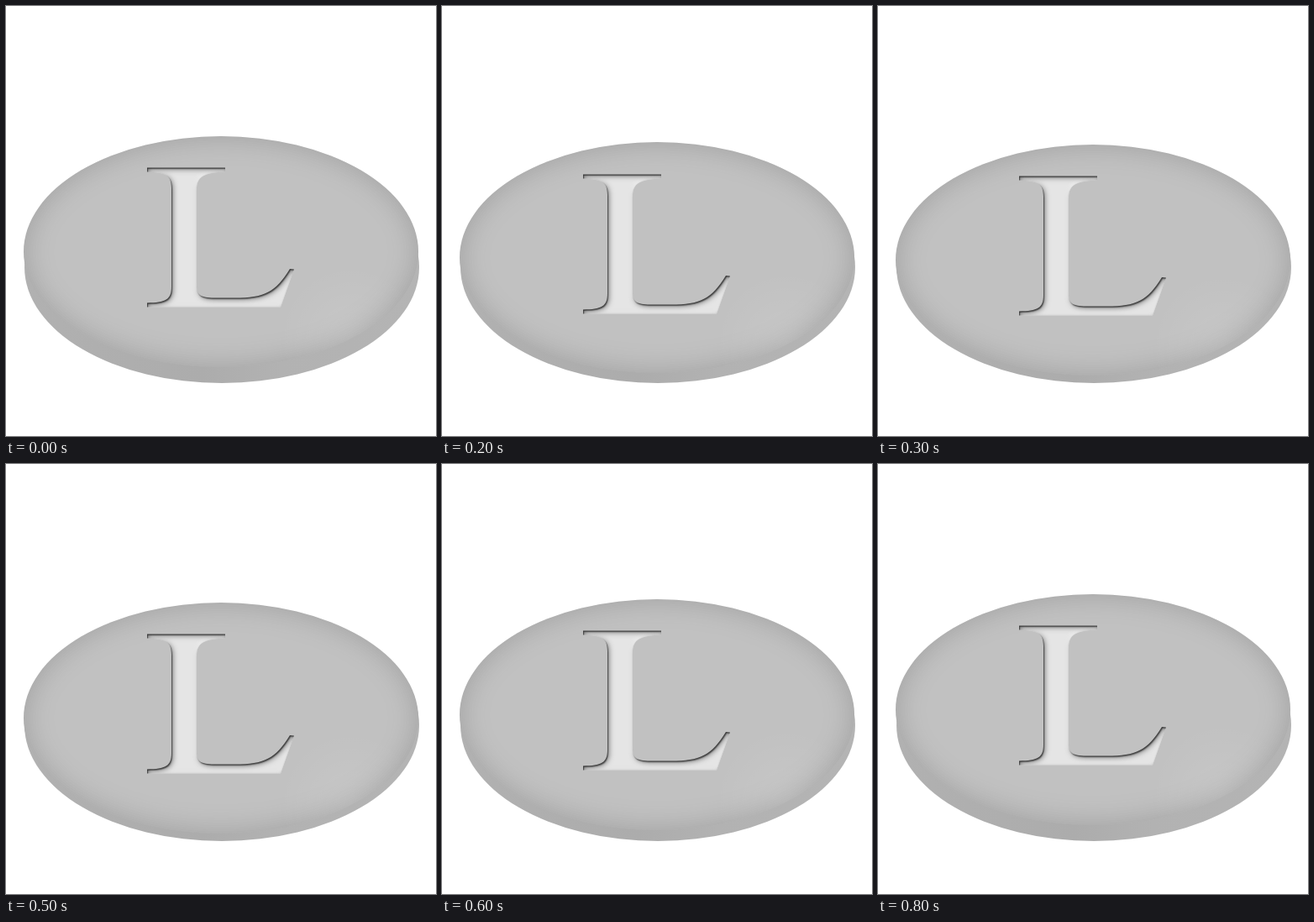
These frames come from a looping animation (512x512 px, 2000 ms). An HTML page with a canvas:

```html
<!DOCTYPE html>
<html>
<head>
<meta charset="utf-8">
<style>
html, body { margin: 0; width: 100%; height: 100%; overflow: hidden; background: #fff; }
canvas { display: block; }
</style>
</head>
<body>
<canvas id="stage" width="512" height="512"></canvas>
<script>
const ctx = document.getElementById('stage').getContext('2d');
const STEP = 100, LOOP = 2000, FAR = 2000;

// How far the button face and the letter are pressed down at each step
const faceDrop = [0, 3, 7, 10, 13, 10, 6, 3, 0];
const letterDrop = [0, 5, 8, 10, 13, 10, 6, 3, 0];

const letter = new Path2D(
  'M168 192.5 H261 V197.5 C239 198.5 228 201 227 217 V333 ' +
  'C227 344 232 347.5 248 347.5 H273 C307 347.5 321 341 338 313 L343 313.5 ' +
  'L327 358.5 H168 V353.5 C190 353 197 350 197 334 V217 ' +
  'C197 202 191 198.5 168 197.5 Z');

function ellipse(x, y, rx, ry) {
  const p = new Path2D();
  p.ellipse(x, y, rx, ry, 0, 0, Math.PI * 2);
  return p;
}

// Shade falling into a shape; the caster itself stays off stage
function innerShade(shape, color, blur, x, y) {
  const outside = new Path2D('M-100 -100 H612 V612 H-100 Z');
  outside.addPath(shape);
  ctx.save();
  ctx.clip(shape);
  ctx.shadowColor = color;
  ctx.shadowBlur = blur;
  ctx.shadowOffsetX = FAR + x;
  ctx.shadowOffsetY = y;
  ctx.translate(-FAR, 0);
  ctx.fill(outside, 'evenodd');
  ctx.restore();
}

function drawBase() {
  const g = ctx.createLinearGradient(22, 0, 492, 0);
  g.addColorStop(0, '#b1b1b1');
  g.addColorStop(0.45, '#acacac');
  g.addColorStop(0.65, '#b2b2b2');
  g.addColorStop(1, '#b4b4b4');
  ctx.fillStyle = g;
  ctx.fill(ellipse(257, 311, 235, 138));
}

function drawFace(drop) {
  const face = ellipse(256, 292.5 + drop, 235, 137.5);
  ctx.fillStyle = '#c1c1c1';
  ctx.fill(face);
  innerShade(face, 'rgba(70,70,70,.28)', 34, 0, 0);
  const glow = ctx.createRadialGradient(410, 394 + drop, 0, 410, 394 + drop, 85);
  glow.addColorStop(0, 'rgba(255,255,255,.1)');
  glow.addColorStop(1, 'rgba(255,255,255,0)');
  ctx.fillStyle = glow;
  ctx.fill(face);
}

function drawLetter(drop) {
  ctx.save();
  ctx.translate(0, drop);
  ctx.fillStyle = '#e5e5e5';
  ctx.fill(letter);
  ctx.fillStyle = '#000';
  innerShade(letter, 'rgba(255,255,255,.8)', 4, -1, -1.5);
  innerShade(letter, 'rgba(0,0,0,.45)', 6, 2, 2);
  innerShade(letter, 'rgba(0,0,0,.6)', 1.5, 1, 1.5);
  ctx.restore();
}

function draw(now) {
  const i = Math.min(Math.floor(now % LOOP / STEP), faceDrop.length - 1);
  ctx.fillStyle = '#fff';
  ctx.fillRect(0, 0, 512, 512);
  drawBase();
  drawFace(faceDrop[i]);
  drawLetter(letterDrop[i]);
}

const start = performance.now();
function tick() {
  draw(performance.now() - start);
  requestAnimationFrame(tick);
}
tick();
</script>
</body>
</html>
```
